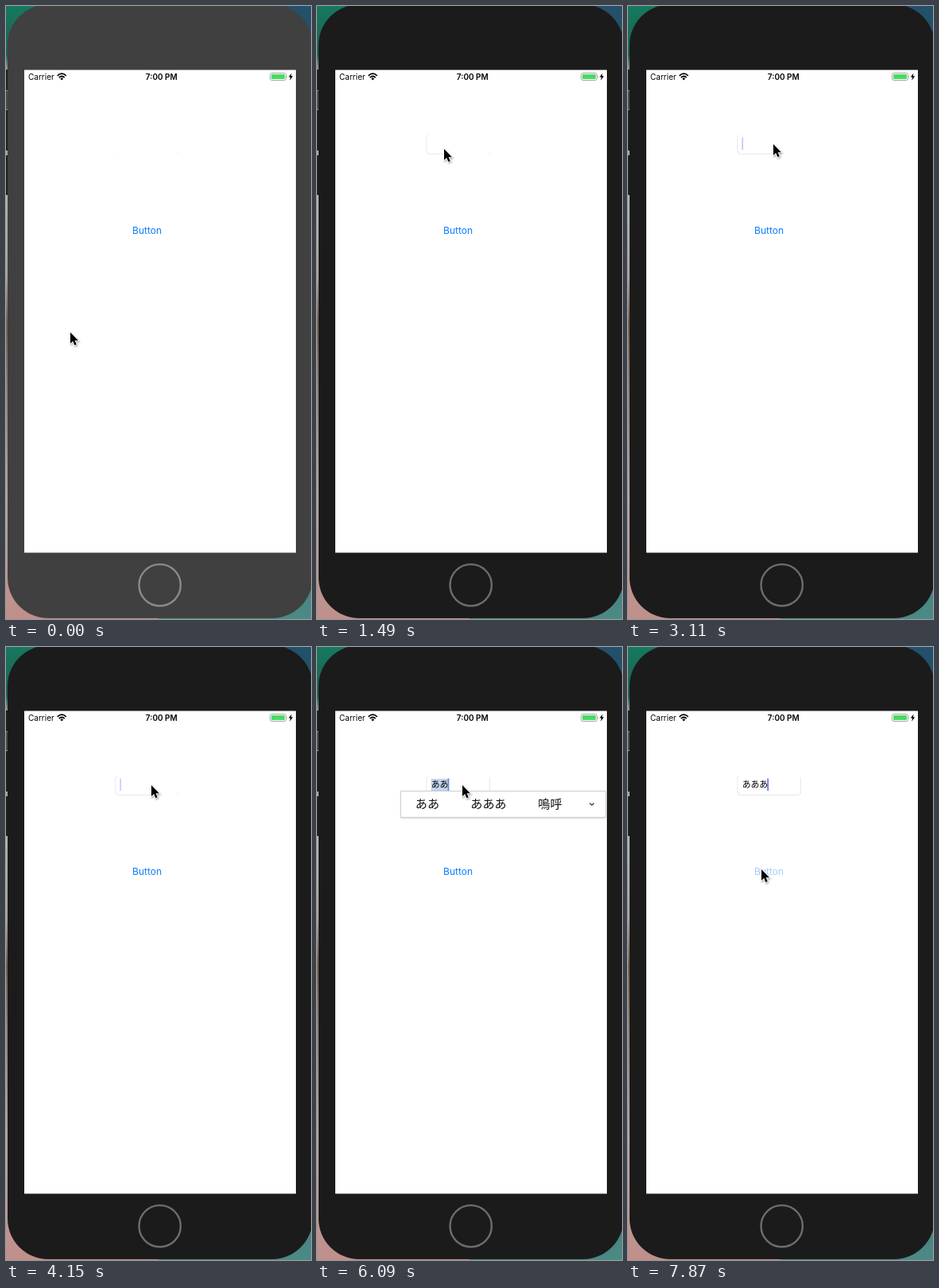
Write an HTML page that moves like this. It is 384 px wide and 772 px high and loops after 8000 ms.

```html
<!DOCTYPE html>
<html lang="ja">
<head>
<meta charset="utf-8">
<title>Text field input</title>
<style>
  html, body { margin: 0; width: 100%; height: 100%; overflow: hidden; background: #1b1b1b; }
  svg { display: block; width: 100%; height: 100%; }
  text { font-family: Inter, Roboto, sans-serif; fill: #000; }
  .jp { font-family: "Noto Sans CJK JP", "Noto Sans CJK", sans-serif; }
  .typed { font-size: 10.8px; }
  .cand { font-size: 15.2px; text-anchor: middle; fill: #111; }

  /* Every change is a hard step on one shared 8 s clock: 1% = 80 ms. */
  .a { animation: 8s step-end infinite; }
  #body { animation-name: dim; }
  #home { animation-name: dimRing; }
  #cursor { animation-name: move; }
  #caret { animation-name: blink; }
  #mark { animation-name: mark; transform-origin: 143.5px 0; }
  #reveal { animation-name: reveal; transform-origin: 136px 0; }
  #button { animation-name: press; }
  #g1 { animation-name: g1; }
  #g2 { animation-name: g2; }
  #g3 { animation-name: g3; }
  #bar { animation-name: bar; }
  #c1 { animation-name: c1; }
  #c2 { animation-name: c2; }
  #c3 { animation-name: c3; }

  @keyframes dim { 0% { fill: #404040; } 1.875%, 100% { fill: #1b1b1b; } }
  @keyframes dimRing { 0% { stroke: #8a8a8a; } 1.875%, 100% { stroke: #6d6d6d; } }

  @keyframes move {
    0% { transform: translate(81px, 411px); }
    3.75% { transform: translate(88px, 385px); }
    5.625% { transform: translate(104px, 310px); }
    7.375% { transform: translate(121px, 232px); }
    9.25% { transform: translate(130px, 188px); }
    11.125% { transform: translate(133px, 179px); }
    18.625% { transform: translate(160px, 180px); }
    20.5% { transform: translate(162px, 177px); }
    22.25% { transform: translate(164px, 174px); }
    27.75% { transform: translate(183px, 174px); }
    89.125% { transform: translate(182px, 182px); }
    91% { transform: translate(180px, 205px); }
    92.75% { transform: translate(175px, 240px); }
    94.625% { transform: translate(170px, 268px); }
    96.5%, 100% { transform: translate(168px, 280px); }
  }

  @keyframes blink {
    0% { opacity: 0; transform: none; }
    24.125% { opacity: 1; transform: none; }
    33.25% { opacity: 0; transform: none; }
    38.875% { opacity: .4; transform: none; }
    40.75% { opacity: 1; transform: none; }
    46.375% { opacity: 0; transform: none; }
    51.875% { opacity: .35; transform: none; }
    53.75% { opacity: 1; transform: none; }
    57.5% { opacity: .6; transform: none; }
    59.375% { opacity: 0; transform: none; }
    63.125% { opacity: .3; transform: none; }
    65% { opacity: .85; transform: none; }
    66.875% { opacity: 1; transform: none; }
    70.5% { opacity: 1; transform: translateX(10.8px); }
    74.25% { opacity: 1; transform: translateX(21.3px); }
    78% { opacity: 1; transform: translateX(32px); }
    89.125% { opacity: .5; transform: translateX(32px); }
    91% { opacity: 0; transform: translateX(32px); }
    94.625% { opacity: .4; transform: translateX(32px); }
    96.5%, 100% { opacity: 1; transform: translateX(32px); }
  }

  @keyframes mark {
    0% { transform: scaleX(0); }
    70.5% { transform: scaleX(1); }
    74.25% { transform: scaleX(2); }
    78% { transform: scaleX(3); }
    81.75%, 100% { transform: scaleX(0); }
  }

  /* The field outline shows only where something has passed over it. */
  @keyframes reveal {
    0% { transform: scaleX(0); }
    18.625% { transform: scaleX(.26); }
    22.25% { transform: scaleX(.46); }
    27.75% { transform: scaleX(.68); }
    72.375%, 100% { transform: scaleX(1); }
  }

  @keyframes press { 0% { opacity: 1; } 98.375%, 100% { opacity: .38; } }
  @keyframes g1 { 0% { visibility: hidden; } 70.5%, 100% { visibility: visible; } }
  @keyframes g2 { 0% { visibility: hidden; } 74.25%, 100% { visibility: visible; } }
  @keyframes g3 { 0% { visibility: hidden; } 78%, 100% { visibility: visible; } }
  @keyframes bar { 0% { opacity: 0; } 72.375% { opacity: 1; } 81.75%, 100% { opacity: 0; } }
  @keyframes c1 { 0% { opacity: 0; } 72.375% { opacity: 1; } 76.125%, 100% { opacity: 0; } }
  @keyframes c2 { 0% { opacity: 0; } 76.125% { opacity: 1; } 78%, 100% { opacity: 0; } }
  @keyframes c3 { 0% { opacity: 0; } 78% { opacity: 1; } 81.75%, 100% { opacity: 0; } }
</style>
</head>
<body>
<svg viewBox="0 0 384 772">
  <defs>
    <linearGradient id="left" x1="0" y1="0" x2="0" y2="1">
      <stop offset="0" stop-color="#16795f"/>
      <stop offset=".08" stop-color="#1c5f52"/>
      <stop offset=".1" stop-color="#8a8d8c"/>
      <stop offset=".3" stop-color="#b4b4b6"/>
      <stop offset=".44" stop-color="#a8a4a2"/>
      <stop offset=".52" stop-color="#76604f"/>
      <stop offset=".62" stop-color="#8f7f76"/>
      <stop offset=".8" stop-color="#b3a5a3"/>
      <stop offset="1" stop-color="#c08f8a"/>
    </linearGradient>
    <linearGradient id="right" x1="0" y1="0" x2="0" y2="1">
      <stop offset="0" stop-color="#23506a"/>
      <stop offset=".5" stop-color="#2c5558"/>
      <stop offset="1" stop-color="#4b8a85"/>
    </linearGradient>
    <clipPath id="seen"><rect id="reveal" class="a" x="136" y="160" width="83" height="28"/></clipPath>
    <filter id="soft" x="-50%" y="-50%" width="200%" height="200%"><feGaussianBlur stdDeviation=".9"/></filter>
    <path id="arrow" d="M0 0V14L3.2 11.1L5.4 16.2L7.8 15.2L5.6 10.2H10Z"/>
  </defs>

  <!-- desktop behind the device -->
  <rect width="192" height="772" fill="url(#left)"/>
  <rect x="192" width="192" height="772" fill="url(#right)"/>
  <path d="M0 80H3V106H0ZM0 131H3V182H0ZM0 188H3V238H0Z" fill="#1f1f1f"/>
  <path d="M0 107H3V130H0Z" fill="#4a4a4a"/>

  <!-- device -->
  <rect id="body" class="a" x="2" y="-2" width="384" height="773" rx="51" fill="#1b1b1b"/>
  <rect x="23" y="80.5" width="342" height="608" fill="#fff"/>
  <circle id="home" class="a" cx="193.7" cy="729.3" r="26.2" fill="none" stroke="#6d6d6d" stroke-width="2.4"/>

  <!-- status bar -->
  <text x="28" y="92.6" font-size="10">Carrier</text>
  <g fill="none" stroke="#000" stroke-width="1.7">
    <path d="M64.7 87.8Q70.2 82.6 75.7 87.8"/>
    <path d="M66.7 90.1Q70.2 86.9 73.7 90.1"/>
  </g>
  <path d="M68.3 91.4Q70.2 89.7 72.1 91.4L70.2 93.4Z"/>
  <text x="195.8" y="92.6" font-size="10" font-weight="600" text-anchor="middle">7:00 PM</text>
  <rect x="332.5" y="84.5" width="20" height="9" rx="2.2" fill="#fff" stroke="#9b9b9b" stroke-width=".9"/>
  <rect x="334" y="86" width="17" height="6" rx=".8" fill="#4cd964"/>
  <path d="M353.7 87.4Q355 89 353.7 90.7Z" fill="#8e8e8e"/>
  <path d="M359.6 84.5L355.8 89.6H358.1L357.2 93.7L361.2 88.2H358.8Z"/>

  <!-- text field -->
  <path d="M139 164l1.2-1M139 183l1.4 2.4M215.5 186l2-2.6" fill="none" stroke="#ededed" stroke-width=".9"/>
  <path d="M138.5 163Q137.8 164 137.8 166V182Q137.8 186.5 142.3 186.5H213Q217.5 186.5 217.5 182V164"
        fill="none" stroke="#e9e9e9" clip-path="url(#seen)"/>
  <rect id="mark" class="a" x="143.5" y="166" width="7.3" height="15" fill="#c3d5ee" style="width:10.7px"/>
  <g class="jp-line">
    <text id="g1" class="a jp typed" x="143.8" y="177.3">あ</text>
    <text id="g2" class="a jp typed" x="154.5" y="177.3">あ</text>
    <text id="g3" class="a jp typed" x="165.2" y="177.3">あ</text>
  </g>
  <rect id="caret" class="a" x="143.4" y="165.5" width="1.5" height="15.5" fill="#456de0"/>

  <text id="button" class="a" x="177.6" y="286.5" font-size="12" text-anchor="middle" style="fill:#0a7cff">Button</text>

  <!-- candidate bar -->
  <g id="bar" class="a">
    <rect x="105.5" y="182" width="258.5" height="33.6" fill="#aaa" filter="url(#soft)" opacity=".6"/>
    <rect x="105.5" y="181.5" width="258" height="33" fill="#fff" stroke="#cfcfcf"/>
    <path d="M343.3 196.6L346 199.2L348.7 196.6" fill="none" stroke="#222" stroke-width="1.2"/>
    <g id="c1" class="a">
      <text class="jp cand" x="139" y="203.2">あ</text>
      <text class="jp cand" x="216" y="203.2">ああ</text>
      <text class="jp cand" x="293.5" y="203.2">亜</text>
    </g>
    <g id="c2" class="a">
      <text class="jp cand" x="139" y="203.2">ああ</text>
      <text class="jp cand" x="216" y="203.2">あああ</text>
      <text class="jp cand" x="293.5" y="203.2">嗚呼</text>
    </g>
    <g id="c3" class="a">
      <text class="jp cand" x="146" y="203.2">あああ</text>
      <text class="jp cand" x="222" y="203.2">アアア</text>
      <text class="jp cand" x="295" y="203.2">嗚呼あ</text>
    </g>
  </g>

  <!-- pointer -->
  <g id="cursor" class="a">
    <use href="#arrow" x=".8" y="1.4" fill="#000" stroke="#000" stroke-width="1.6" opacity=".35" filter="url(#soft)"/>
    <use href="#arrow" stroke="#fff" stroke-width="1.8" stroke-linejoin="round"/>
    <use href="#arrow"/>
  </g>
</svg>
</body>
</html>
```
